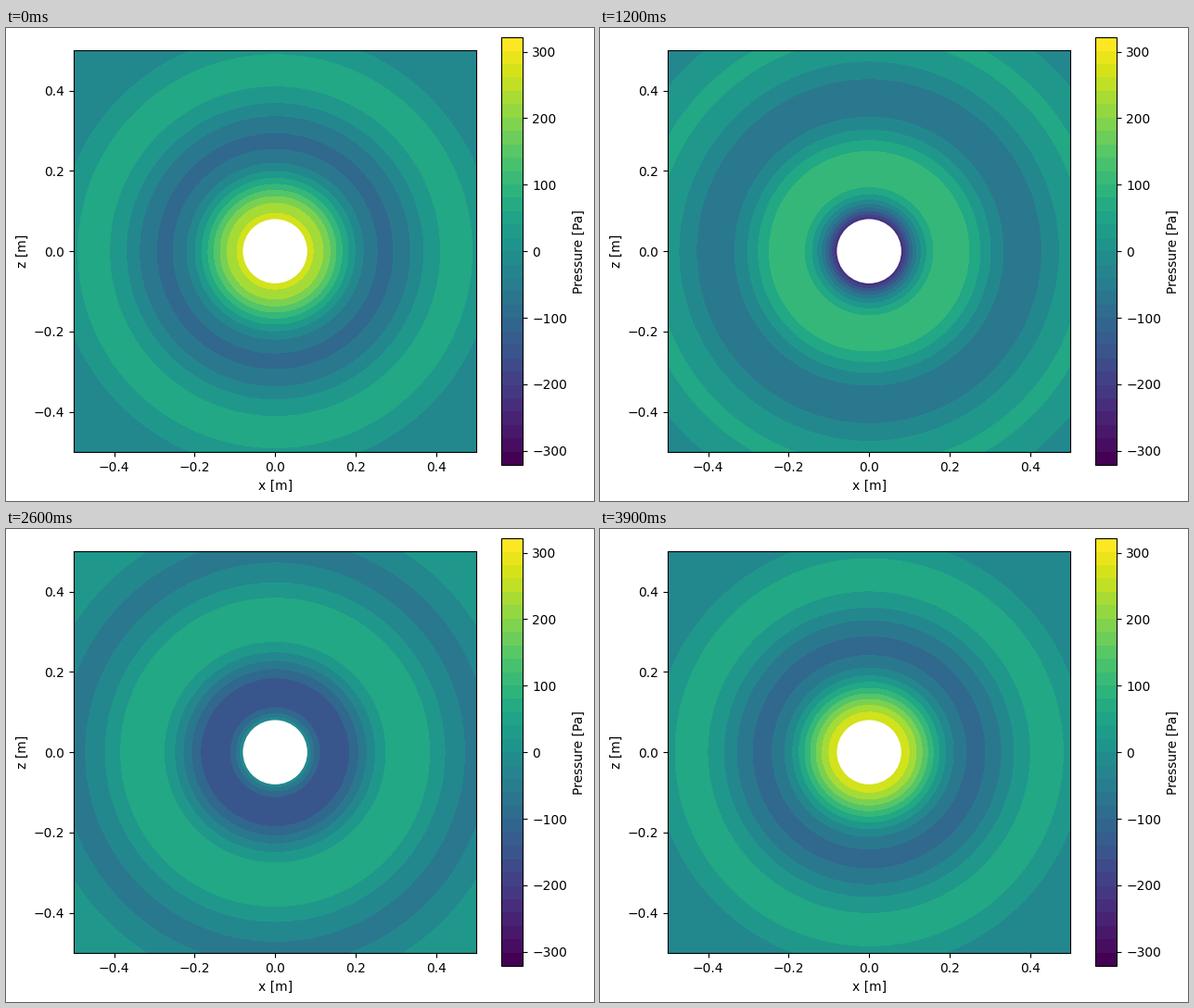
Recreate the animation shown at these times as a matplotlib script. Size 634 px wide and 511 px high, loop 4 s.

```python
import numpy as np
import matplotlib.pyplot as plt
from matplotlib.animation import FuncAnimation
from matplotlib.cm import ScalarMappable
from matplotlib.colors import Normalize
from matplotlib.patches import Circle

W, H, DPI = 634, 511, 100
FRAMES, INTERVAL = 40, 100

P_MAX = 321.4                    # pressure amplitude at the sphere surface [Pa]
RADIUS = 0.08                    # sphere radius [m]
K = 2 * np.pi * 1000 / 343       # wavenumber of a 1 kHz tone in air
PHASE = np.arctan(1 / (K * RADIUS))  # lead of pressure over surface velocity
STEP = P_MAX / 7.5
LEVELS = STEP * np.arange(-8, 9)

plt.rcParams["font.family"] = "DejaVu Sans"
plt.rcParams["font.size"] = 10

fig = plt.figure(figsize=(W / DPI, H / DPI), dpi=DPI, facecolor="white")


def add_axes(x, y, w, h):
    """Add axes given in pixels from the lower left corner."""
    return fig.add_axes([x / W, y / H, w / W, h / H])


ax = add_axes(73.15, 52.85, 434, 434)
cax = add_axes(534.25, 38.85, 23.1, 462)

norm = Normalize(-P_MAX, P_MAX)
bar_map = ScalarMappable(norm=norm, cmap=plt.get_cmap("viridis", 32))
fig.colorbar(bar_map, cax=cax, label="Pressure [Pa]")

axis = np.linspace(-0.5, 0.5, 200)
X, Z = np.meshgrid(axis, axis)
R = np.ma.masked_less(np.hypot(X, Z), 0.8 * RADIUS)

field = None


def pressure(i):
    """Outgoing spherical wave of a pulsating sphere."""
    angle = 2 * np.pi * i / FRAMES + PHASE - K * (R - RADIUS)
    return P_MAX * RADIUS / R * np.cos(angle)


def update(i):
    global field
    if field is not None:
        field.remove()
    field = ax.contourf(X, Z, pressure(i), levels=LEVELS, extend="both",
                        cmap="viridis", norm=norm)
    return [field]


def init():
    return update(0)


ax.add_patch(Circle((0, 0), RADIUS, facecolor="white", edgecolor="none",
                    zorder=2))
ax.set(xlim=(-0.5, 0.5), ylim=(-0.5, 0.5), xlabel="x [m]", ylabel="z [m]")

anim = FuncAnimation(fig, update, frames=FRAMES, init_func=init,
                     interval=INTERVAL, repeat=True, repeat_delay=0)
plt.show()
```
